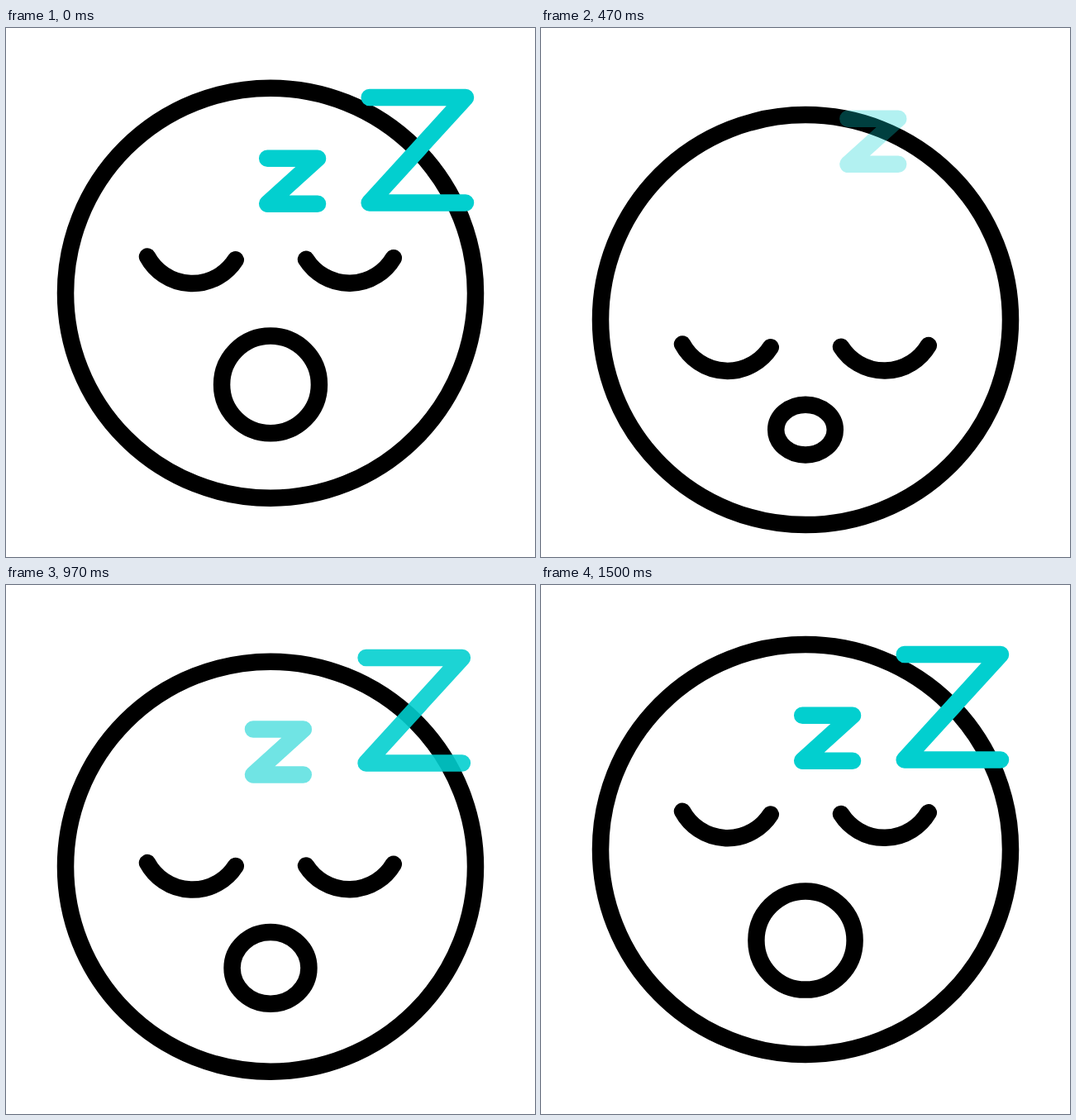
An HTML page that plays this animation: 640 by 640 pixels, repeating every 1.67 s.

```html
<!DOCTYPE html>
<html lang="en">
<head>
<meta charset="utf-8">
<title>Sleeping face</title>
<style>
  html, body { margin: 0; width: 100%; height: 100%; overflow: hidden; background: #fff; }
  svg { display: block; width: 100%; height: 100%; fill: none; stroke: #000; stroke-width: 20.5; stroke-linecap: round; stroke-linejoin: round; }
  .z { stroke: #02cfcf; }
</style>
</head>
<body>
<svg viewBox="0 0 640 640">
  <g id="head">
    <circle cx="320" cy="320" r="248"/>
    <path id="eyes" d="M171 273.7A62 62 0 0 0 277.8 277.5M363 277A62 62 0 0 0 468.8 275.3"/>
    <ellipse id="mouth" cx="320"/>
  </g>
  <path id="small" class="z" d="M316.2 157.7H377L316.2 212.7H377"/>
  <path id="big" class="z" d="M439.7 84H556L439.7 211.5H556"/>
</svg>
<script>
const LOOP = 1670, PEAK = 17.5, REST = 45;
const [head, eyes, mouth, small, big] =
  ['head', 'eyes', 'mouth', 'small', 'big'].map(id => document.getElementById(id));

// Eases 0..1 between two ticks; a and b are the x handles of a flat-ended Bezier.
function ease(tick, from, to, a = 1 / 3, b = 2 / 3) {
  const x = Math.min(1, Math.max(0, (tick - from) / (to - from)));
  let lo = 0, hi = 1;
  for (let i = 0; i < 24; i++) {
    const s = (lo + hi) / 2, r = 1 - s;
    if (3 * r * r * s * a + 3 * r * s * s * b + s * s * s < x) lo = s; else hi = s;
  }
  return lo * lo * (3 - 2 * lo);
}

function lerpKeys(tick, keys) {
  const i = keys.findIndex(([t]) => t > tick);
  if (i < 0) return keys[keys.length - 1][1];
  if (!i) return keys[0][1];
  const [t0, v0] = keys[i - 1], [t1, v1] = keys[i];
  return v0 + (v1 - v0) * (tick - t0) / (t1 - t0);
}

const nod = (tick, down, up) => tick < PEAK
  ? ease(tick, -2, PEAK, ...down)
  : 1 - ease(tick, PEAK, REST, ...up);

const shift = (el, x, y) => el.setAttribute('transform', `translate(${x} ${y})`);

function place(el, x, y, opacity) {
  shift(el, x, y);
  el.setAttribute('opacity', opacity);
}

// A letter slides in from the lower left while fading in.
function arrive(el, tick, from, to) {
  const away = 1 - ease(tick, from, to);
  place(el, -39.5 * away, 38.5 * away, 1 - away);
}

function draw(ms) {
  const tick = Math.min(REST, Math.floor((ms % LOOP + 4) * 0.03));

  shift(head, 0, 35 * nod(tick, [0.423, 0.527], [0.222, 0.744]));
  const breath = nod(tick, [0.366, 0.561], [0.197, 0.623]);
  shift(eyes, 0, 80.3 * breath);
  mouth.setAttribute('cy', 430 + 24.4 * breath);
  mouth.setAttribute('rx', 59.6 - 25.3 * breath);
  mouth.setAttribute('ry', 59.6 - 31.1 * breath);

  if (tick < 20) {
    const gone = ease(tick, 3.08, 11.7);
    place(big, 53 * gone, -46.6 * gone, 1 - gone);
  } else arrive(big, tick, 20.6, 31.1);

  if (tick < 23) {
    const gone = ease(tick, 3.1, 15.3);
    const fade = lerpKeys(tick, [[3, 1], [5, 0.94], [10, 0.54], [14, 0.3], [19, 0.13], [23, 0]]);
    place(small, 57 * gone, -49.5 * gone, fade);
  } else arrive(small, tick, 23.3, 33.8);
}

function loop() {
  draw(performance.now());
  requestAnimationFrame(loop);
}
loop();
</script>
</body>
</html>
```
